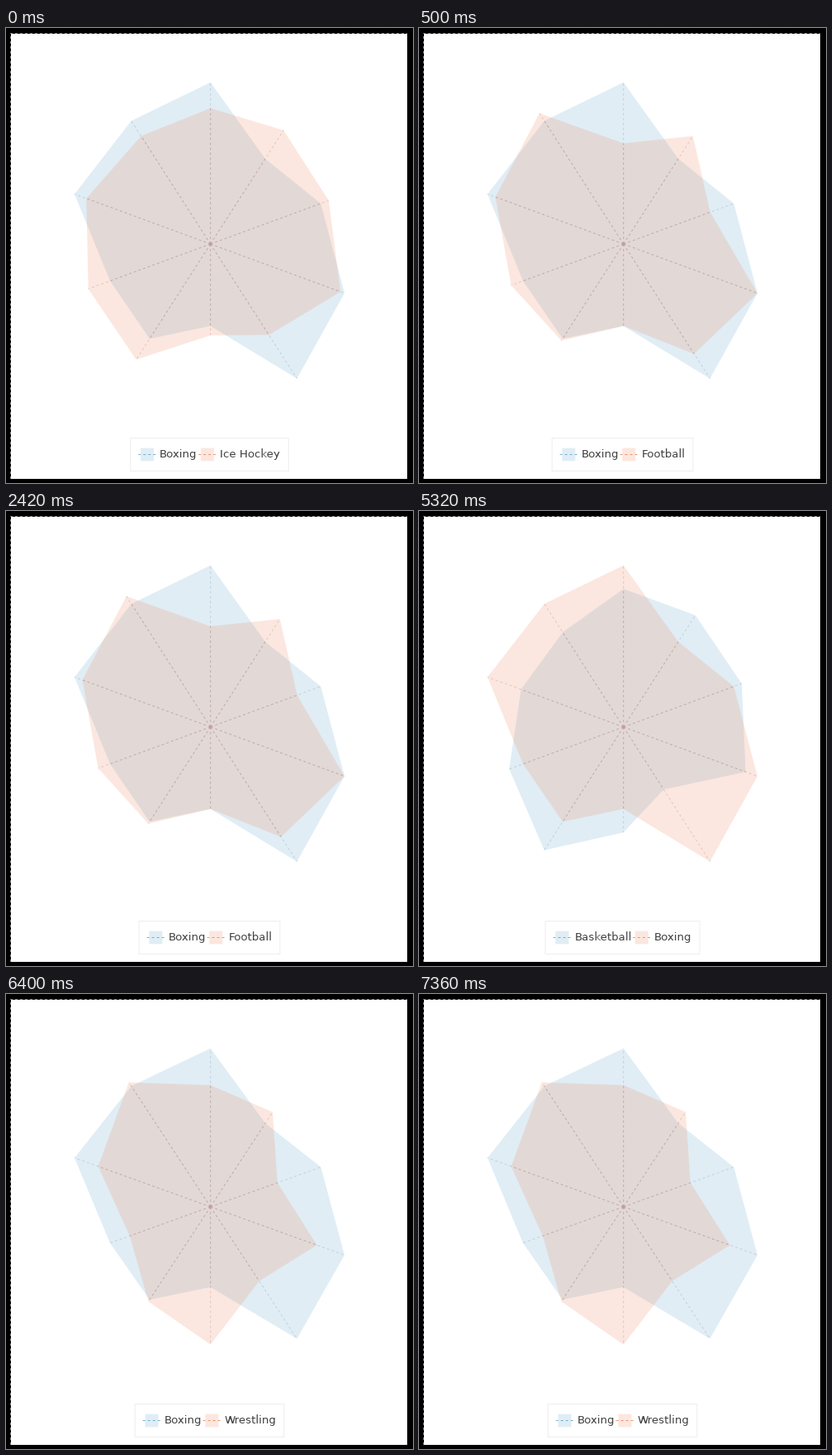
Write a matplotlib script that moves like this. It is 493 by 552 pixels and loops after 8000 ms.

```python
import numpy as np
import matplotlib.pyplot as plt
from matplotlib.animation import FuncAnimation
from matplotlib.patches import Circle, Polygon, Rectangle
from matplotlib.textpath import TextPath

plt.rcParams["font.family"] = "DejaVu Sans"
plt.rcParams["text.hinting"] = "default"

W, H, DPI = 493, 552, 64
STEP, LOOP = 100, 8000
PX = 72 / DPI  # points per pixel
FONT = 13.33

FILLS = ["#67a9cf", "#ef8a62"]
SPOKES = ["#7396a8", "#b9796a"]

# Skill scores in eighths of a point, clockwise from the top
SCORES = {
    "Boxing": [69, 45, 56, 68, 71, 35, 50, 51, 69, 65],
    "Ice Hockey": [58, 60, 60, 66, 48, 39, 61, 62, 63, 57],
    "Football": [43, 57, 44, 68, 58, 35, 51, 57, 65, 69],
    "Basketball": [59, 59, 60, 62, 33, 45, 65, 58, 52, 50],
    "Wrestling": [53, 51, 34, 54, 40, 60, 51, 41, 57, 67],
}
SCENES = {
    0: ("Boxing", "Ice Hockey"),
    500: ("Boxing", "Football"),
    3700: ("Basketball", "Boxing"),
    6400: ("Boxing", "Wrestling"),
}
# Corners of the area that each pair of shapes fills exactly
TOP_LEFT, BOTTOM_RIGHT = np.array([83, 66]), np.array([410, 425.3])

fig = plt.figure(figsize=(W / DPI, H / DPI), dpi=DPI, facecolor="black")
ax = fig.add_axes([0, 0, 1, 1])
ax.set_xlim(0, W)
ax.set_ylim(H, 0)
ax.axis("off")


def dashed(x, y, color, alpha):
    return ax.plot(x, y, color=color, alpha=alpha, lw=PX, snap=False,
                   ls=(0, (3, 3)), dash_capstyle="butt")[0]


def corners(name):
    angle = np.arange(10) * np.pi / 5
    return np.array(SCORES[name])[:, None] * np.column_stack(
        [np.sin(angle), -np.cos(angle)])


def radar(pair):
    shapes = [corners(name) for name in pair]
    both = np.concatenate(shapes)
    low, high = both.min(axis=0), both.max(axis=0)
    scale = (BOTTOM_RIGHT - TOP_LEFT) / (high - low)
    center = TOP_LEFT - low * scale
    parts = []
    for shape, fill, line in zip(shapes, FILLS, SPOKES):
        tips = center + shape * scale
        area = Polygon(tips, fc=fill, alpha=0.2, lw=0)
        parts.append(ax.add_patch(area))
        for tip in tips:
            parts.append(dashed(*zip(center, tip), line, 0.3))
    dot = Circle(center, 1.7, fc="#c89a98", lw=0)
    return parts + [ax.add_patch(dot)]


def text_width(name):
    return TextPath((0, 0), name, size=FONT).get_extents().x1 + 1.2


def legend(pair):
    width = 72.7 + sum(map(text_width, pair))
    x = 246.5 - width / 2
    box = Rectangle((x, 497.5), width, 40, fc="white", ec="#eeeeee",
                    lw=PX, snap=False)
    parts = [ax.add_patch(box)]
    for name, fill in zip(pair, FILLS):
        key = Rectangle((x + 12.3, 509.6), 16, 15.8, fc=fill, alpha=0.2,
                        lw=0, snap=False)
        parts.append(ax.add_patch(key))
        parts.append(dashed([x + 9.5, x + 31.5], [517.5] * 2, fill, 0.9))
        parts.append(ax.text(x + 35.4, 521, name, color="#444444",
                             size=FONT * PX, va="baseline"))
        x += text_width(name) + 27.5
    return parts


def build(pair):
    parts = radar(pair) + legend(pair)
    # Keep fills, dashes and labels in drawing order
    for z, part in enumerate(parts):
        part.set_zorder(10 + z)
    return parts


ax.add_patch(Rectangle((6, 7), 480, 540, fc="white", ec="none"))
dashed([5.5, 5.5, 486], [547, 6.5, 6.5], "white", 0.5)
groups = {start: build(pair) for start, pair in SCENES.items()}


def draw(i):
    now = max(start for start in groups if start <= i * STEP)
    for start, group in groups.items():
        for part in group:
            part.set_visible(start == now)
    return []


anim = FuncAnimation(fig, draw, frames=LOOP // STEP, interval=STEP,
                     init_func=lambda: draw(0), repeat=True, repeat_delay=0)
plt.show()
```
